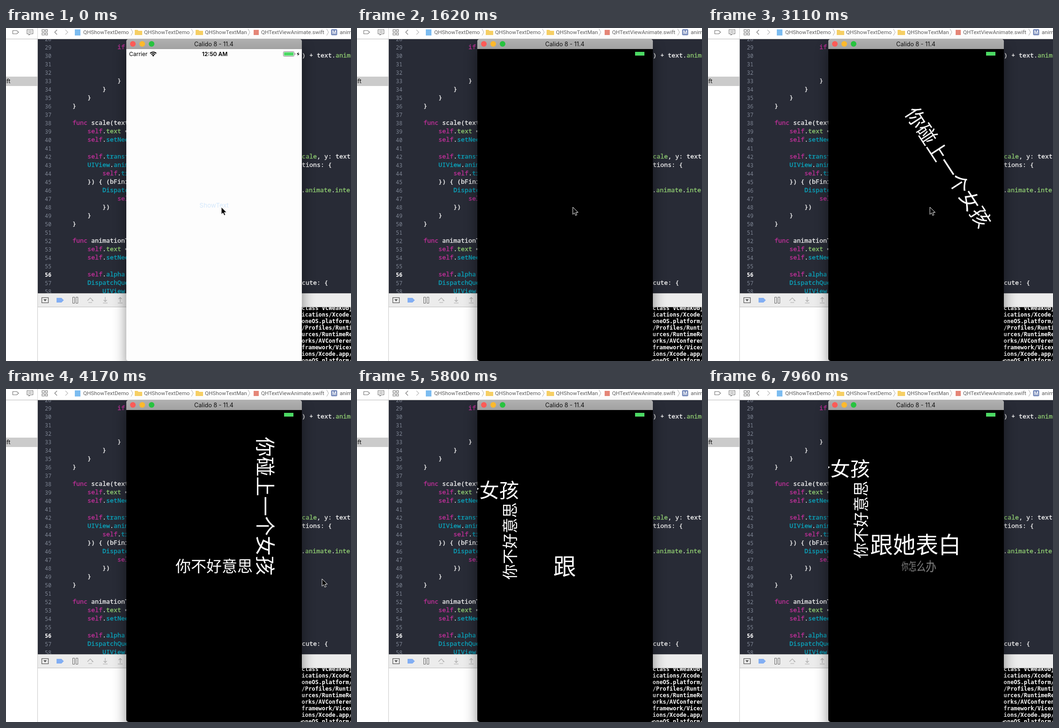
Recreate the animation shown at these times as an HTML page. Size 737x712 px, loop 8000 ms.

```html
<!DOCTYPE html>
<html lang="zh">
<head>
<meta charset="utf-8">
<title>Text animation</title>
<style>
html, body { margin: 0; width: 100%; height: 100%; overflow: hidden; background: #fff; }
svg, #win, #screen, .line { position: absolute; }
svg { left: 0; top: 0; }
text { white-space: pre; }
.code { font: 500 13.34px "Noto Sans Mono", "DejaVu Sans Mono", monospace; stroke-width: .35; }
.num { font: 11.7px "Noto Sans Mono", "DejaVu Sans Mono", monospace; fill: #7d8492; text-anchor: end; }
.log { font: bold 12px "DejaVu Sans Mono", monospace; fill: #fff; }
.path { font: 11.6px Roboto, "Open Sans", sans-serif; fill: #5c5c5c; }
.ui { font-family: Inter, Roboto, sans-serif; }
#win { left: 257px; top: 24px; width: 375px; height: 688px; border-radius: 5px; overflow: hidden; background: #fdfdfd; }
#shade { position: absolute; left: 257px; top: 24px; width: 375px; height: 688px; border-radius: 5px; box-shadow: 0 18px 28px rgba(0,0,0,.45); }
#screen { left: 0; top: 21px; width: 375px; height: 667px; background: #000; overflow: hidden; }
.line { left: 0; top: 0; line-height: 1; white-space: nowrap; color: #fff; transform-origin: 50% 55.6%;
  font-family: "Noto Sans CJK SC", "Noto Sans CJK", sans-serif; }
#stage { position: absolute; left: 0; top: 0; width: 737px; height: 712px; overflow: hidden; }
</style>
</head>
<body>
<div id="stage">
<svg width="737" height="712">
  <rect y="104" width="68" height="20" fill="#cbcbcb"/>
  <text x="-1.500" y="118" class="ui" font-size="12">ift</text>
  <rect x="68" y="24" width="669" height="543" fill="#282b36"/>
  <g id="code"></g>
  <rect x="632" y="597" width="105" height="115" fill="#000"/>
  <g id="log" class="log"></g>

  <rect width="737" height="23" fill="#fff"/>
  <path d="M0 23.5H737" stroke="#b9b9b9"/>
  <path d="M67.5 0V23" stroke="#d6d6d6"/>
  <g fill="none" stroke="#777" stroke-width="1.2">
    <path d="M14.5 5.5H23L27 9L23 12.5H14.5Z"/>
    <path d="M45 3.5H57.500V12.500H52L49 15V12.500H45Z M47.500 6.500H55 M47.500 9.500H55"/>
    <path d="M77 3.500H82V8H77Z M84.500 3.500H88.500V8H84.500Z M77 10.500H82V15H77Z M84.500 10.500H88.500V15H84.500Z"/>
    <path d="M109 4L104 9L109 14"/>
    <path d="M127 4L132 9L127 14" stroke="#bbb"/>
    <path id="crumbs" stroke="#aaa" stroke-width="1"/>
  </g>
  <rect x="147" y="3" width="12" height="13" fill="#7cbcf0"/>
  <path id="folders" fill="#f6cf65"/>
  <rect x="529" y="4" width="11" height="11" fill="#e58678"/>
  <rect x="694.500" y="2.500" width="13" height="13" rx="2" fill="#7387b8"/>
  <text x="701" y="13" class="ui" font-size="10" font-weight="600" fill="#fff" text-anchor="middle">M</text>
  <g class="path">
    <text x="165" y="13">QHShowTextDemo</text><text x="295" y="13">QHShowTextDemo</text>
    <text x="425" y="13">QHShowTextMan</text><text x="545" y="13">QHTextViewAnimate.swift</text>
    <text x="713" y="13">anim</text>
  </g>

  <rect x="68" y="567" width="669" height="30" fill="#ececec"/>
  <path d="M68 567.500H737M68 596.500H737" stroke="#bdbdbd"/>
  <path d="M67.500 24V712" stroke="#c8c8c8"/>
  <rect x="76.500" y="576.500" width="14" height="11" fill="none" stroke="#555" stroke-width="1.2"/>
  <path d="M80 580H87L83.500 584.500Z" fill="#555"/>
  <path d="M108 577H118.500L123.500 582L118.500 587H108Z" fill="#82aef3"/>
  <path d="M142.500 575.500h4v13h-4zM149.500 575.500h4v13h-4z" fill="none" stroke="#666"/>
  <g fill="none" stroke="#aaa" stroke-width="1.2">
    <path d="M174 583L180 577L186 583H183M176 587H184"/>
    <path d="M212 575V585M208.500 581.500L212 585L215.500 581.500M207 588H217"/>
    <path d="M244 586V576M240.500 579.500L244 576L247.500 579.500M239 588H249"/>
  </g>
</svg>

<div id="shade"></div>
<div id="win">
  <svg width="375" height="688" class="ui">
    <defs><linearGradient id="bar" x2="0" y2="1"><stop stop-color="#b0b0b0"/><stop offset="1" stop-color="#a2a2a2"/></linearGradient></defs>
    <rect width="375" height="21" fill="url(#bar)"/>
    <path d="M0 20.500H375" stroke="#999"/>
    <circle cx="14" cy="10" r="6" fill="#fc5b57"/><circle cx="34" cy="10" r="6" fill="#fdb92d"/><circle cx="54" cy="10" r="6" fill="#27c33f"/>
    <text x="187" y="14.500" font-size="12.6" text-anchor="middle" fill="#111">Calido 8 - 11.4</text>
    <text x="6" y="36" font-size="12">Carrier</text>
    <g fill="none" stroke="#000" stroke-width="2">
      <path d="M51 30.200A9 9 0 0 1 64 30.200M53.500 32.800A5.600 5.600 0 0 1 61.500 32.800"/>
    </g>
    <path d="M57.500 37L55 34.500A3.600 3.600 0 0 1 60 34.500Z"/>
    <text x="189" y="35.500" font-size="12" font-weight="600" text-anchor="middle">12:50 AM</text>
    <rect x="335.500" y="26.500" width="23" height="10" rx="2" fill="none" stroke="#777"/>
    <rect x="337" y="28" width="20" height="7" fill="#4cd964"/>
    <path d="M360 30v3q2-1.500 0-3M368.500 27L364 32H367L365.500 36L370 31H367Z"/>
    <text x="187.500" y="360" font-size="13.600" text-anchor="middle" fill="#d5e8fb">ShowText</text>
  </svg>
  <div id="screen"><svg width="375" height="667"><rect x="337" y="6" width="20" height="8" fill="#4cd964"/></svg></div>
</div>
<svg width="737" height="712"><path id="cursor" d="M0 0V15.500L3.600 12.200L6 17.800L8.700 16.600L6.300 11.300H11.300Z" stroke="#fff" stroke-linejoin="round"/></svg>
</div>

<script>
const $ = id => document.getElementById(id);

// Syntax marks: ~ keyword, ^ type, * member, _ plain
const ink = { '~': '#c1309a', '^': '#0ba5bd', '*': '#90cd72', '_': '#f4f4f4' };
const code = [
  [29, 238, '~if'], [30, 632, '_) + text.*anim'],
  [33, 238, '_}'], [34, 206, '_}'], [35, 174, '_}'], [36, 142, '_}'],
  [38, 142, '~func_ scale(text'], [39, 174, '~self_.*text_ ='], [40, 174, '~self_.^setNee'],
  [42, 174, '~self_.^transf'], [42, 632, '*cale_, y: text'],
  [43, 174, '^UIView_.^anim'], [43, 632, '_tions: {'],
  [44, 206, '~self_.^tra'], [45, 174, '_}) { (bFini'],
  [46, 206, '^Dispatc'], [46, 631, '_.*animate_.*inte'], [47, 238, '~self'],
  [48, 206, '_})'], [49, 174, '_}'], [50, 142, '_}'],
  [52, 142, '~func_ animationT'], [53, 174, '~self_.*text_ ='], [54, 174, '~self_.^setNee'],
  [56, 174, '~self_.^alpha'], [57, 174, '^DispatchQue'], [57, 632, '_cute: {'], [58, 206, '^UIView_.']
];
const rowY = n => 45 + (n - 29) * 18;
const paint = s => s.replace(/([~^*_])([^~^*_]*)/g,
  (m, k, t) => `<tspan fill="${ink[k]}" stroke="${ink[k]}">${t}</tspan>`);
let html = '';
for (let n = 28; n <= 58; n++)
  html += `<text class="num" x="97" y="${rowY(n) + 1}"${n == 56 ? ' style="fill:#fff;font-weight:bold"' : ''}>${n}</text>`;
for (const [n, x, s] of code) html += `<text class="code" x="${x}" y="${rowY(n)}">${paint(s)}</text>`;
$('code').innerHTML = html;

$('log').innerHTML = ['class VCWeakObj', 'ications/Xcode.', 'oneOS.platform/', '/Profiles/Runti', 'urces/RuntimeRe',
  'orks/AVConferen', 'framework/Vicex', 'ions/Xcode.app/', 'oneOS.platform/']
  .map((s, i) => `<text x="631.5" y="${602.5 + i * 14}">${s}</text>`).join('');
$('crumbs').setAttribute('d', [267, 396, 517, 685].map(x => `M${x} 2L${x + 4} 9L${x} 16`).join(''));
$('folders').setAttribute('d', [275, 405].map(x => `M${x} 4h6l2 2h8v9h-16z`).join(''));

const LOOP = 8000, CX = 444.5, CY = 379.5;
const clamp = v => Math.min(1, Math.max(0, v));
const ease = (t, from, to) => { const f = clamp((t - from) / (to - from)); return f * f * (3 - 2 * f); };
const mix = (a, b, f) => a + (b - a) * f;

function makeLine(text, size) {
  const el = document.createElement('div');
  el.className = 'line';
  el.textContent = text;
  el.style.fontSize = size + 'px';
  $('screen').append(el);
  return { el, depth: size * text.length * 2.5 };
}
const first = makeLine('你碰上一个女孩', 42.3);
const second = makeLine('你不好意思', 33);
const third = makeLine('跟她表白', 48.6);
const fourth = makeLine('你怎么办', 26.5);

// flip 0 is edge-on, smaller and clear; 1 is facing and opaque
function place({ el, depth }, x, y, angle, flip) {
  el.style.opacity = flip;
  el.style.transform = `translate(${x - 257}px,${y - 45}px) translate(-50%,-55.6%) rotate(${angle}deg)`
    + (flip < 1 ? ` scale(${mix(.9, 1, flip)}) perspective(${depth}px) rotateY(${(flip - 1) * 90}deg)` : '');
}

const track = [[0, 460, 383], [869, 460, 383], [870, 459, 383], [989, 459, 383], [990, 460, 383], [1409, 460, 383],
  [1410, 461, 383], [2009, 461, 383], [2010, 462, 383], [2340, 462, 383], [2570, 464, 383], [3110, 474, 383],
  [3930, 474, 383], [4170, 675, 406], [4370, 694, 404], [4609, 694, 404], [4610, 721, 404], [LOOP, 721, 404]];

function moveCursor(t) {
  const i = track.findIndex(k => k[0] > t), a = track[i - 1], b = track[i];
  const f = (t - a[0]) / (b[0] - a[0]);
  $('cursor').setAttribute('transform', `translate(${mix(a[1], b[1], f)} ${mix(a[2], b[2], f)})`);
  $('cursor').style.display = t < 4670 ? '' : 'none';
}

function draw(t) {
  $('screen').style.display = t < 1620 ? 'none' : '';
  const drop = ease(t, 2832, 3305), turn = ease(t, 5350, 5720), lift = -46 * ease(t, 6560, 7010);

  // The second line carries the first one round with it
  const gx = mix(CX, 327, turn), gy = mix(CY, 325, turn) + lift, a = -turn * Math.PI / 2;
  const dx = mix(0, 108.5, drop), dy = mix(0, -129, drop), c = Math.cos(a), s = Math.sin(a);
  place(first, gx + dx * c - dy * s, gy + dx * s + dy * c, 90 * (drop - turn), ease(t, 2310, 2820));
  place(second, gx, gy, -90 * turn, ease(t, 3590, 4090));

  const typed = [5780, 5970, 6180, 6410].filter(k => t >= k).length;
  third.el.textContent = '跟她表白'.slice(0, typed);
  place(third, 443.5, CY + lift, 0, 1);
  place(fourth, CX + 1, CY, 0, ease(t, 7700, 8210));
  moveCursor(t);
}

const start = performance.now();
function tick() {
  draw((performance.now() - start) % LOOP);
  requestAnimationFrame(tick);
}
tick();
</script>
</body>
</html>
```
